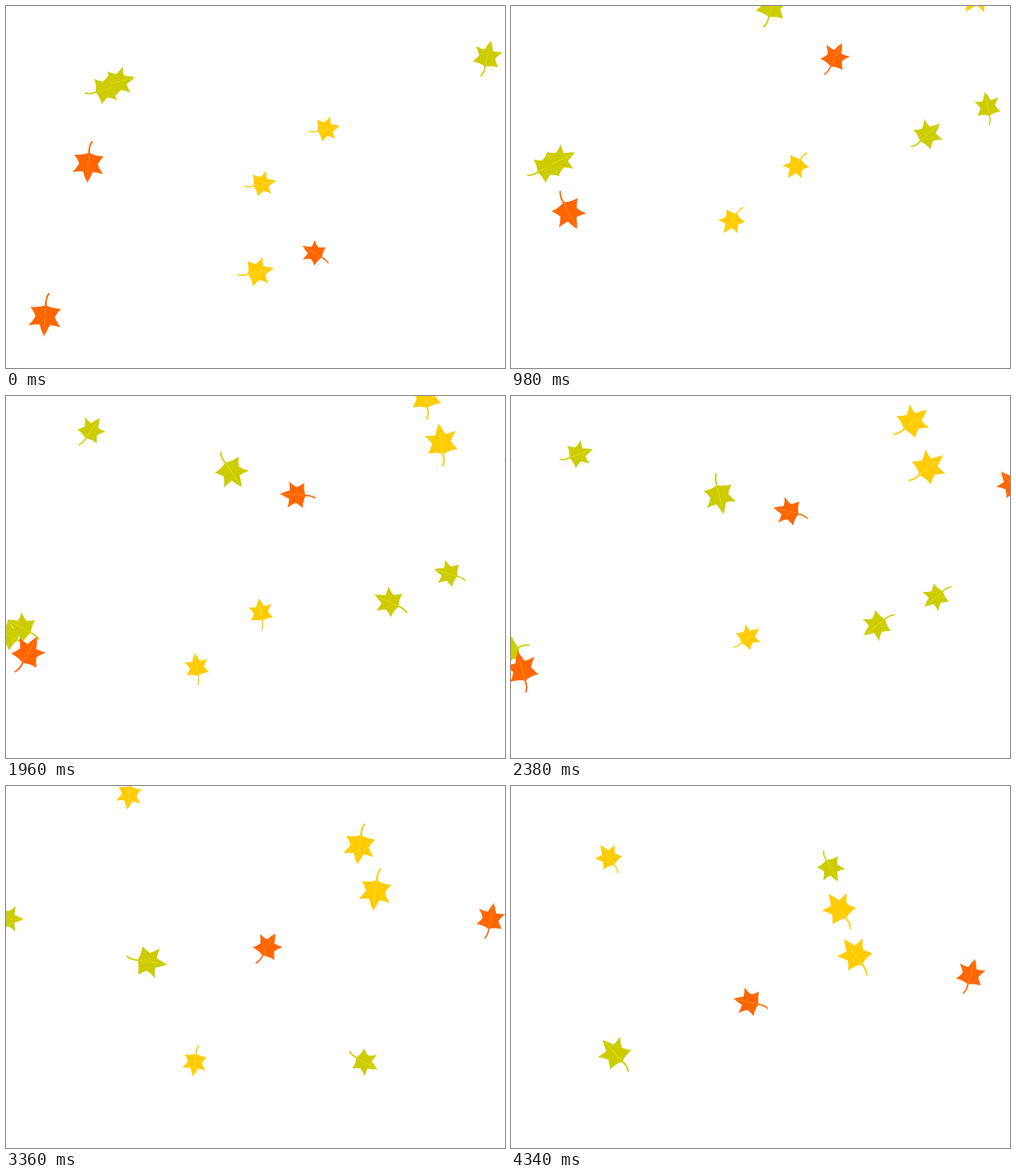
Animation of 600x436 px, one loop 4.48 s. Source, as an HTML page with a canvas:

```html
<!DOCTYPE html>
<html lang="en">
<head>
<meta charset="utf-8">
<title>Falling leaves</title>
<style>
  html, body { margin: 0; width: 100%; height: 100%; overflow: hidden; background: #fff; }
  canvas { display: block; }
</style>
</head>
<body>
<canvas id="stage" width="600" height="436"></canvas>
<script>
const ctx = document.getElementById('stage').getContext('2d');
const STEP = 140, STEPS = 32;
const GUSTS = [0, 7, 12, 17, 21, 24, 31]; // steps at which the wind changes

// Leaves of one colour share their drift, given as the distance covered at each gust
const GREEN = {
  fill: '#cccc00', vein: '#dcdc10',
  left: [0, 77, 105, 140, 186, 218, 267],
  down: [0, 94, 168, 217, 263, 307, 416],
};
const YELLOW = {
  fill: '#ffcc00', vein: '#ffd83a',
  left: [0, 44, 66, 100, 142, 159, 190],
  down: [0, 46, 91, 142, 172, 186, 259],
};
const ORANGE = {
  fill: '#ff6600', vein: '#ff8020',
  left: [0, 29, 62, 86, 96, 104, 134],
  down: [0, 58, 103, 136, 166, 190, 257],
};

// Turning rules: step -> degrees
const spin = step => 77 + 19.6 * step;
const swing = (middle, reach, peak, pace = 0.165) =>
  step => middle + reach * Math.cos(pace * (step - peak));

// [tone, size, start x, start y, turning, first visible step]
const leaves = [
  [GREEN, 1.05, 121, 100, swing(-32, 120, 3)],
  [GREEN, 1.05, 137, 91, swing(-32, 120, 3)],
  [GREEN, 1.04, 579, 60, swing(-75, 130, 5)],
  [GREEN, 0.94, 650, 26, swing(-130, 120, 7.5)],
  [GREEN, 1.15, 391, -95, swing(37, 130, 17.5)],
  [GREEN, 0.96, 222, -147, swing(15, 80, 22)],
  [GREEN, 0.95, 652, -316, swing(22, 130, 31), 25],
  [YELLOW, 0.89, 386, 148, spin],
  [YELLOW, 0.9, 309, 214, spin],
  [YELLOW, 1.03, 304, 320, spin],
  [YELLOW, 1.2, 603, -57, spin],
  [YELLOW, 1.16, 584, -112, spin],
  [YELLOW, 0.93, 307, -174, spin, 22],
  [ORANGE, 0.87, 370, 297, swing(-100, 41, 0)],
  [ORANGE, 1.17, 99, 192, swing(-285, 115, 2)],
  [ORANGE, 1.22, 47, 376, swing(-285, 115, 2)],
  [ORANGE, 1, 419, 3, swing(-30, 60, 6, 0.35), 1],
  [ORANGE, 1.02, 687, -31, swing(-28, 50, 28)],
];

// Upright leaf, about 32 px wide, mirrored about its stem
const half = new Path2D(`M0-18Q3.2-12 5-6.5Q10-6.5 15.8-8Q11.5-3 9.5 1.5Q11.5 6 15 10.3Q7 9.8 0 13Z`);
const blade = new Path2D(half);
blade.addPath(half, new DOMMatrix([-1, 0, 0, 1, 0, 0]));
blade.rect(-0.5, -15, 1, 27);
const stem = new Path2D('M0 12Q1 20-2.5 25');
const vein = new Path2D('M0 12V-9');

function along(distances, step) {
  const next = GUSTS.findIndex(gust => gust >= step) || 1;
  const part = (step - GUSTS[next - 1]) / (GUSTS[next] - GUSTS[next - 1]);
  return distances[next - 1] + (distances[next] - distances[next - 1]) * part;
}

function drawLeaf([tone, size, x, startY, turning, born = 0], step) {
  const y = startY + along(tone.down, step);
  const floor = size < 1.1 ? 352 : 380;
  if (step < born || y > floor) return;
  ctx.save();
  ctx.translate(x - along(tone.left, step), y);
  ctx.rotate(turning(step) * Math.PI / 180);
  ctx.scale(size, size);
  ctx.fillStyle = ctx.strokeStyle = tone.fill;
  ctx.lineWidth = 1.6;
  // Each half is filled on its own winding, so fill them together with the midrib
  ctx.fill(half);
  ctx.scale(-1, 1);
  ctx.fill(half);
  ctx.scale(-1, 1);
  ctx.stroke(stem);
  ctx.strokeStyle = tone.vein;
  ctx.lineWidth = 1;
  ctx.stroke(vein);
  ctx.restore();
}

function render() {
  const step = Math.floor(performance.now() / STEP) % STEPS;
  ctx.fillStyle = '#fff';
  ctx.fillRect(0, 0, 600, 436);
  for (const leaf of leaves) drawLeaf(leaf, step);
  requestAnimationFrame(render);
}
render();
</script>
</body>
</html>
```
